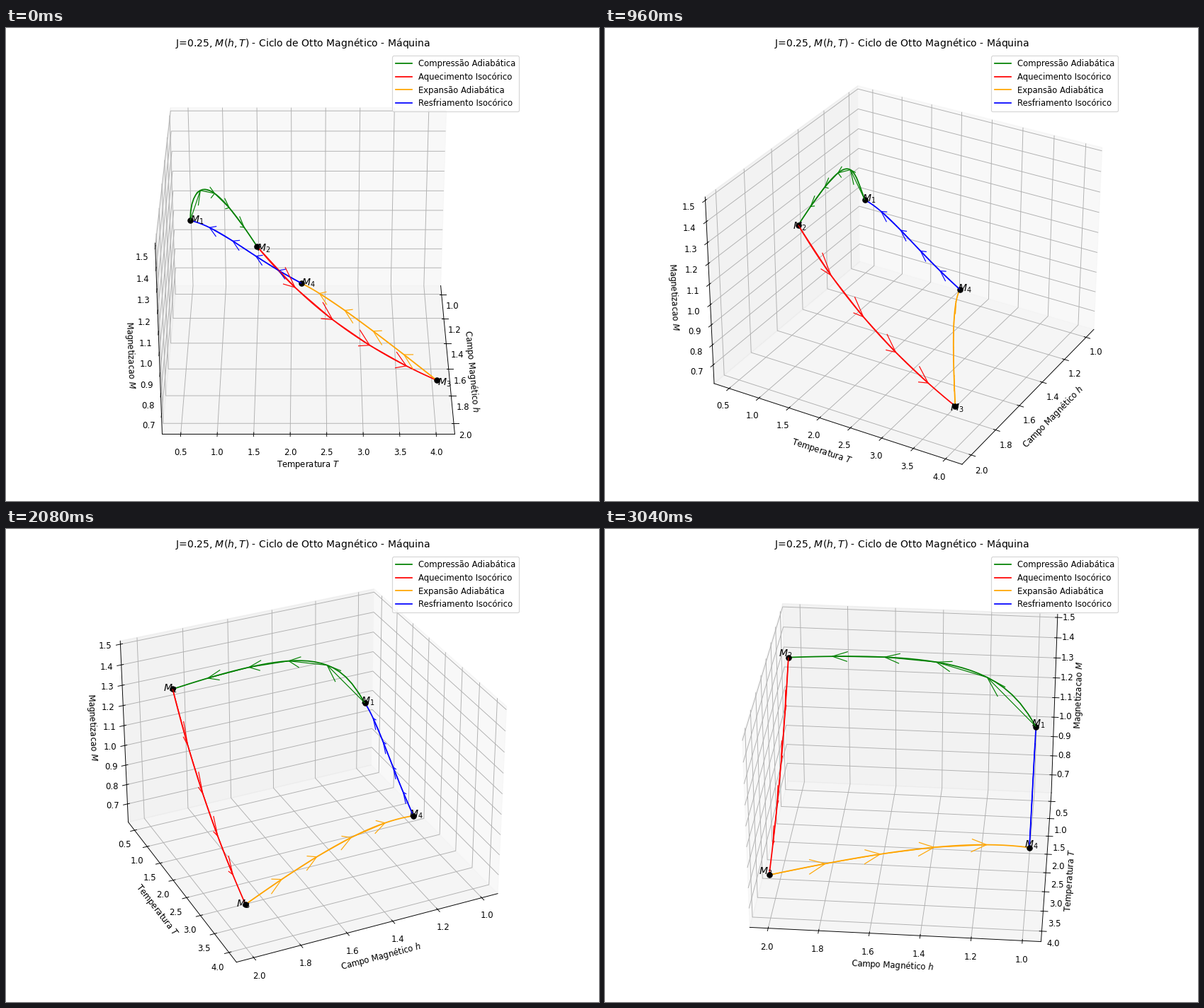
Recreate the animation shown at these times as a matplotlib script. Size 837 by 669 pixels, loop 3200 ms.

```python
import numpy as np
import matplotlib.pyplot as plt
from matplotlib.animation import FuncAnimation

W, H, DPI = 837, 669, 83.7
FRAMES, INTERVAL, STEP_DEG = 20, 160, 5
J = 0.25
N, STRIDE = 30, 6


def levels(h, T):
    """Boltzmann weights of the triplet and the singlet of two coupled spins."""
    h, T = np.broadcast_arrays(np.asarray(h, float), np.asarray(T, float))
    return np.exp(np.array([2 * h, 0 * h, -2 * h, 0 * h + 8 * J]) / T)


def magnetization(h, T):
    w = levels(h, T)
    return 2 * (w[0] - w[2]) / w.sum(axis=0)


def entropy(h, T):
    w = levels(h, T)
    p = w / w.sum(axis=0)
    return -(p * np.log(p)).sum(axis=0)


def adiabat(h, s):
    """Temperatures at fields h that keep the entropy at s, by bisection."""
    lo, hi = np.full_like(h, 0.2), np.full_like(h, 8.0)
    for _ in range(60):
        mid = (lo + hi) / 2
        low = entropy(h, mid) < s
        lo, hi = np.where(low, mid, lo), np.where(low, hi, mid)
    return (lo + hi) / 2


def limits(values, pad=0.5 * (1.1 * 25 / 24 - 1)):
    lo, hi = np.min(values), np.max(values)
    return lo - pad * (hi - lo), hi + pad * (hi - lo)


# The four strokes of the cycle
up = np.linspace(1, 2, N)
down = up[::-1]
T_up = adiabat(up, entropy(1, 0.5))
T_down = adiabat(down, entropy(2, 4.0))
strokes = [
    ("Compressão Adiabática", "green", up, T_up),
    ("Aquecimento Isocórico", "red", np.full(N, 2.0), np.linspace(T_up[-1], 4, N)),
    ("Expansão Adiabática", "orange", down, T_down),
    ("Resfriamento Isocórico", "blue", np.full(N, 1.0), np.linspace(T_down[-1], 0.5, N)),
]

fig = plt.figure(figsize=((W + 0.01) / DPI, (H + 0.01) / DPI), dpi=DPI)
side, bottom = 623, 12.55
ax = fig.add_axes([(W - side) / 2 / W, bottom / H, side / W, side / H],
                  projection="3d")

all_m = []
for i, (label, color, h, T) in enumerate(strokes):
    m = magnetization(h, T)
    all_m.append(m)
    ax.plot(h, T, m, color=color, label=label)

    path = np.array([h, T, m])
    start = path[:, :N - STRIDE:STRIDE]
    end = path[:, STRIDE::STRIDE]
    ax.quiver(*start, *(end - start), color=color, linewidth=1,
              arrow_length_ratio=0.3)

    ax.scatter(h[0], T[0], m[0], color="black", s=40, depthshade=False)
    ax.text(h[0] * 1.02, T[0], m[0], f"$M_{i + 1}$", fontsize=12)

ax.set_xlim(*limits([1, 2]))
ax.set_ylim(*limits([0.5, 4]))
ax.set_zlim(*limits(all_m))
ax.set_xlabel("Campo Magnético $h$")
ax.set_ylabel("Temperatura $T$")
ax.set_zlabel("Magnetizacao $M$")
ax.set_title("J=0.25, $M(h,T)$ - Ciclo de Otto Magnético - Máquina")
ax.legend(loc="upper right")


def update(frame):
    ax.view_init(elev=30, azim=STEP_DEG * frame)
    return []


anim = FuncAnimation(fig, update, frames=FRAMES, interval=INTERVAL,
                     repeat=True, repeat_delay=0, blit=False)
plt.show()
```
